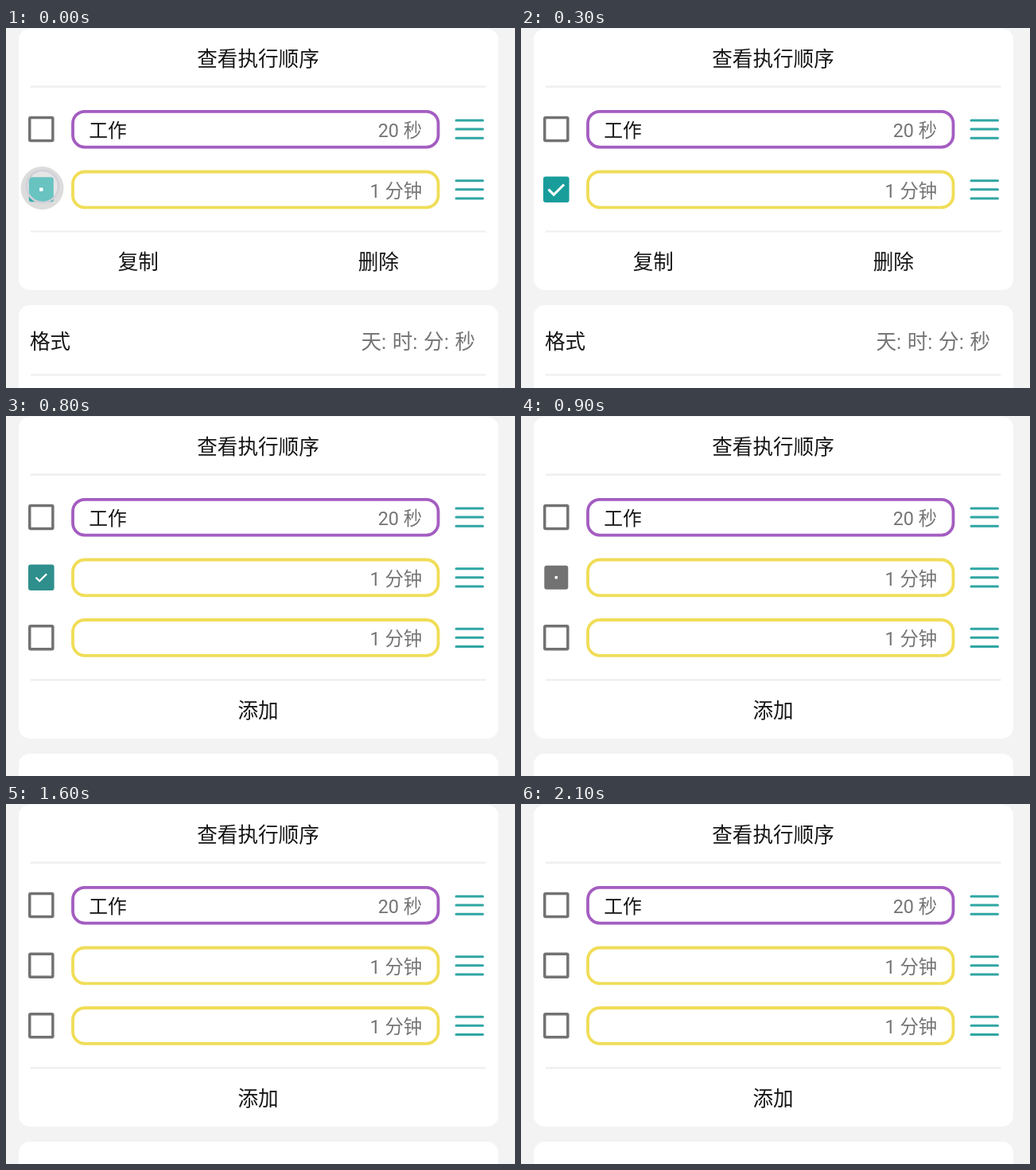
These frames come from a looping animation (640 px wide and 452 px high, 2.2 s). An HTML page:

```html
<!DOCTYPE html>
<html lang="zh-CN">
<head>
<meta charset="utf-8">
<style>
  html, body { margin: 0; width: 100%; height: 100%; overflow: hidden; background: #f3f3f3; }
  svg { display: block; width: 640px; height: 452px; }
  text { font: 25.6px "Noto Sans CJK SC", "Noto Sans CJK", sans-serif; fill: #161616; }
  .mid { text-anchor: middle; }
  .row { font-size: 23.8px; }
  .value { font-family: Roboto, "Noto Sans CJK SC", "Noto Sans CJK", sans-serif; fill: #757575; text-anchor: end; }
  .row.value { font-size: 23.4px; }
  .rule { stroke: #eeeeee; stroke-width: 2.2; }
</style>
</head>
<body>
<svg id="stage" viewBox="0 0 640 452"></svg>
<script>
const LOOP = 2200, STEP = 100;
const TEAL = '#189d9b', GRAY = '#727272', PURPLE = '#a45dc1', YELLOW = '#f0dd58';
const stage = document.getElementById('stage');

const label = (x, y, text, cls = '') => `<text x="${x}" y="${y}" class="${cls}">${text}</text>`;
const card = (y, h) => `<rect x="16" y="${y}" width="603" height="${h}" rx="14" fill="#fff"/>`;
const rule = y => `<path class="rule" d="M31 ${y}H603.5"/>`;
const square = (y, size, fill, rx) =>
  `<rect x="${44.3 - size / 2}" y="${y - size / 2}" width="${size}" height="${size}" rx="${rx}" fill="${fill}"/>`;

// A filled box with a centred white opening and a scalable tick.
function checkbox(y, { size = 32.6, color = GRAY, hole = 25.6, tick = 0 } = {}) {
  const mark = tick && `<path d="M-11.3 0L-3.6 7.6L11.3 -7.2" fill="none" stroke="#fff"
    stroke-width="3.6" transform="translate(44.3 ${y}) scale(${tick})"/>`;
  return square(y, size, color, 3) + (hole ? square(y, hole, '#fff', .6) : '') + (mark || '');
}

function row(y, color, name, time, box) {
  const bars = [-11, 0, 11.3].map(d => `M566 ${y + d}H599.5`).join('');
  return checkbox(y, box) +
    `<rect x="84" y="${y - 22.2}" width="459.5" height="44.8" rx="15" fill="none" stroke="${color}" stroke-width="3.8"/>` +
    label(104.2, y + 9.9, name, 'row') + label(523.2, y + 9.9, time, 'row value') +
    `<path d="${bars}" stroke="#2fa6a3" stroke-width="3" stroke-linecap="round"/>`;
}

function rows(second, copied) {
  return row(127, PURPLE, '工作', '20 秒') +
    row(202.7, YELLOW, '', '1 分钟', second) +
    (copied ? row(278.2, YELLOW, '', '1 分钟') : '');
}

const ring = (x, y, fill) =>
  `<circle cx="${x}" cy="${y}" r="20" fill="#fff" fill-opacity="${fill}" stroke="#d2d0da" stroke-width="2.6"/>`;

function selecting(t) {
  const ripple = t < 100 ? 1 : t < 200 ? .3 : 0;
  const box = t < 100 ? { size: 31, color: '#35aeac', hole: 4.5 }
    : { color: TEAL, hole: 0, tick: Math.min(1, .4 + t / 650) };
  return card(1, 328) + card(348, 140) +
    `<circle cx="45.5" cy="201" r="27" fill="#dcdcdc" opacity="${ripple}"/>` +
    rows(box, false) + rule(255.5) +
    label(166.3, 303.2, '复制', 'mid') + label(468.3, 303.2, '删除', 'mid') +
    label(30, 402.5, '格式') +
    `<text x="590" y="402.5" class="value" style="word-spacing:1.2px">天: 时: 分: 秒</text>` +
    rule(435.5) +
    (t < 100 ? ring(46, 199, .25) : '') +
    (t >= 700 ? ring(161, 306, .62) : '');
}

function unchecking(t) {
  if (t < 900) return { color: '#2f8f8c', hole: 0, tick: .6 };
  if (t < 1000) return { size: 30, hole: 3.5 };
  if (t < 1100) return { size: 32.5, hole: 23 };
  return {};
}

function copied(t) {
  return card(1, 404) + card(424, 140) + rows(unchecking(t), true) +
    rule(331.3) + label(317, 379, '添加', 'mid');
}

let shown = -1;
function draw(now) {
  const t = Math.floor(now % LOOP / STEP) * STEP;
  if (t !== shown) {
    shown = t;
    stage.innerHTML = (t < 800 ? selecting(t) : copied(t)) +
      label(317, 47.9, '查看执行顺序', 'mid') + rule(73.6);
  }
}

const start = performance.now();
function tick() {
  draw(performance.now() - start);
  requestAnimationFrame(tick);
}
tick();
</script>
</body>
</html>
```
